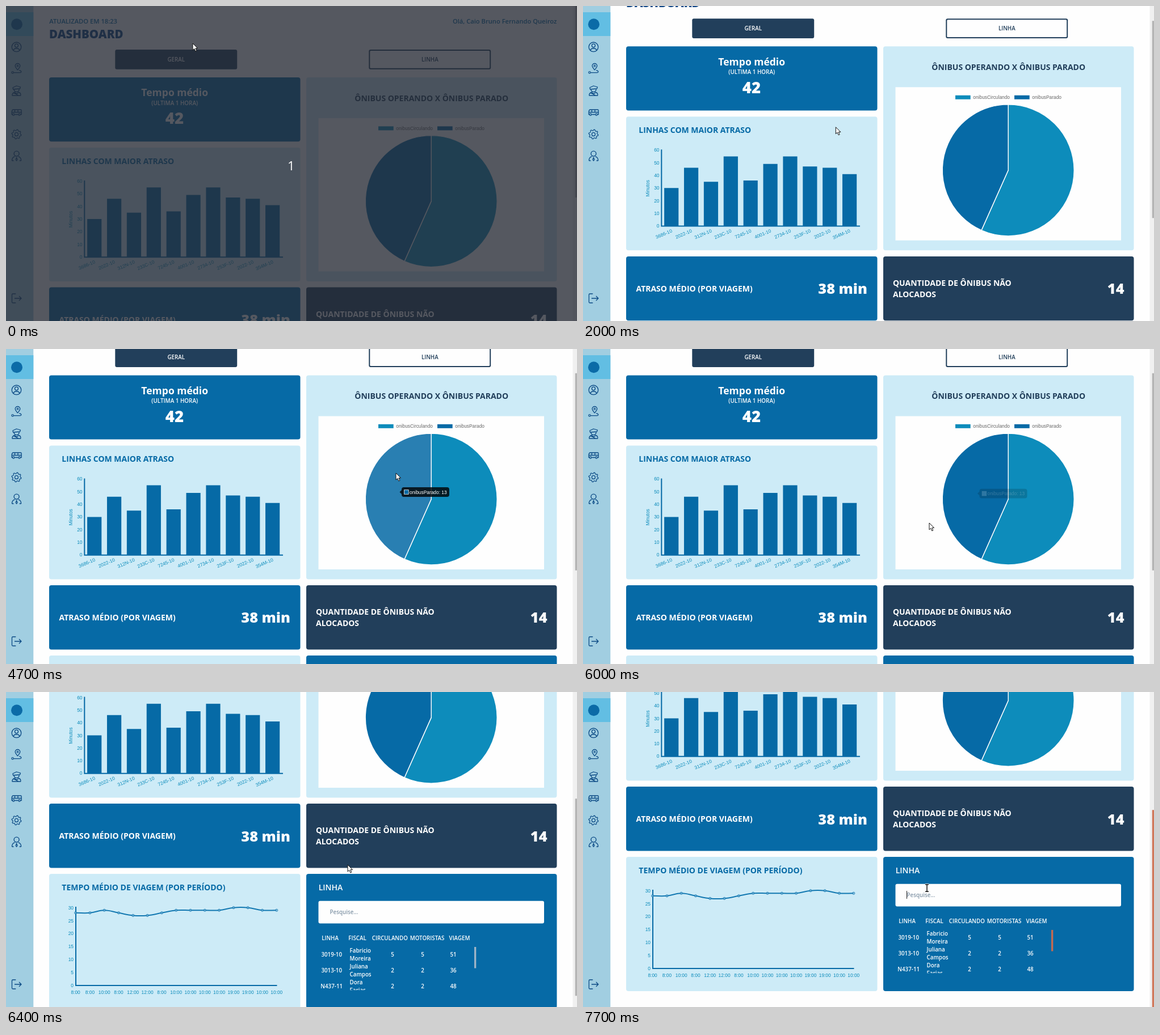
An HTML page with a canvas that plays this animation: 1006 px wide and 556 px high, repeating every 8 s.

```html
<!DOCTYPE html>
<html lang="pt-BR">
<head>
<meta charset="utf-8">
<title>Dashboard</title>
<style>
  html, body { margin: 0; width: 100%; height: 100%; overflow: hidden; background: #fefefe; }
  canvas { display: block; }
</style>
</head>
<body>
<canvas id="stage" width="1006" height="556"></canvas>
<script>
const ctx = document.getElementById('stage').getContext('2d');
const W = 1006, H = 556, LOOP = 8000, STEP = 100;
const SANS = '"Open Sans", sans-serif';
const CHART = '"Liberation Sans", Arial, sans-serif';
const BLUE = '#066aa6', LIGHT = '#cdebf7', TEAL = '#0d8cbb', NAVY = '#223f5b';
const ICON = '#0b4a85', WHITE = '#fefefe';

const BARS = [
  ['3686-10', 30], ['2022-10', 46], ['312N-10', 35], ['233C-10', 55], ['7245-10', 36],
  ['4001-10', 49], ['2734-10', 55], ['253F-10', 47], ['2022-10', 46], ['354M-10', 41]
];
const TRIPS = [28, 28, 29, 28, 27, 27, 28, 29, 29, 29, 29, 30, 30, 29, 29];
const HOURS = [8, 8, 10, 8, 12, 12, 8, 10, 10, 10, 10, 19, 19, 10, 10];
const ROWS = [
  ['3019-10', 'Fabricio', 'Moreira', 5, 5, 51],
  ['3013-10', 'Juliana', 'Campos', 2, 2, 36],
  ['N437-11', 'Dora', 'Farias', 2, 2, 48]
];

// Motion: each track is a list of [time, ...values]
const SCROLL = [[1600, 0], [1900, 46], [2200, 79.6], [6000, 79.6], [6400, 299.5], [6700, 299.5], [7100, 329.5]];
const POINTER = [
  [400, 329, 66], [1300, 449, 195], [1400, 460, 200], [1900, 460, 200], [2300, 366, 288],
  [2600, 366, 288], [3000, 331, 290], [3300, 331, 290], [3700, 263, 275], [4200, 427, 203],
  [4500, 655, 215], [4700, 687, 219], [4800, 687, 219], [5200, 785, 270], [5500, 785, 270],
  [5600, 785, 270], [5800, 655, 295], [6000, 610, 307], [6400, 602, 305], [6700, 602, 305],
  [7100, 588, 314], [7200, 588, 314], [7400, 606, 346]
];
const BAR_HOVERS = [[6, 2200, 2700], [5, 2700, 3500], [3, 3500, 4000]];
const BAR_TIP = [
  [2200, 345, 323], [2600, 345, 323], [2900, 287, 319.3], [3400, 287, 319.3], [3700, 240, 323]
];
const BAR_TIP_ALPHA = [[2100, 0], [2400, 1], [4000, 1], [4400, 0]];
const PIE_TIP = [[4800, 697, 323.7], [5200, 703, 347.5], [5600, 703, 347.5], [6000, 698.5, 326.3]];
const PIE_TIP_ALPHA = [[4300, 0], [4600, 1], [5700, 1], [6000, 0.2], [6100, 0]];

function track(t, keys) {
  let a = keys[0];
  if (t <= a[0]) return a.slice(1);
  for (const b of keys) {
    if (t < b[0]) {
      const p = (t - a[0]) / (b[0] - a[0]), e = p * p * (3 - 2 * p);
      return a.slice(1).map((v, i) => v + (b[i + 1] - v) * e);
    }
    a = b;
  }
  return a.slice(1);
}

function fade(t, on, off) {
  const up = Math.min(1, Math.max(0, (t - on) / 200));
  const down = Math.min(1, Math.max(0, (t - off) / 200));
  return up - down;
}

// y is the middle of the capital letters
function text(s, x, y, size, color, weight = 600, align = 'left', family = SANS) {
  ctx.font = `${weight} ${size}px ${family}`;
  ctx.textAlign = align;
  ctx.fillStyle = color;
  ctx.fillText(s, x, y + size * 0.357);
}

const label = (s, x, y, align, color = TEAL, weight = 400) =>
  text(s, x, y, 8.4, color, weight, align, CHART);

function turned(s, x, y, angle, align) {
  ctx.save();
  ctx.translate(x, y);
  ctx.rotate(angle);
  label(s, 0, 0, align);
  ctx.restore();
}

function box(x0, y0, x1, y1, color, r = 0) {
  ctx.beginPath();
  ctx.roundRect(x0, y0, x1 - x0, y1 - y0, r);
  ctx.fillStyle = color;
  ctx.fill();
}

function line(color, width, ...pts) {
  ctx.beginPath();
  for (let i = 0; i < pts.length; i += 2) ctx.lineTo(pts[i], pts[i + 1]);
  ctx.strokeStyle = color;
  ctx.lineWidth = width;
  ctx.stroke();
}

function disc(x, y, r, fill, stroke, width = 1.2) {
  ctx.beginPath();
  ctx.arc(x, y, r, 0, 7);
  if (fill) { ctx.fillStyle = fill; ctx.fill(); }
  if (stroke) { ctx.strokeStyle = stroke; ctx.lineWidth = width; ctx.stroke(); }
}

function drawHeader() {
  text('ATUALIZADO EM 18:23', 76.3, 27, 11.18, BLUE);
  text('DASHBOARD', 76, 49.7, 20.5, '#0a4384', 800);
  text('Olá, Caio Bruno Fernando Queiroz', 970.3, 27, 11.18, BLUE, 600, 'right');
  box(192.3, 77, 407.2, 111.7, NAVY, 3);
  text('GERAL', 299.7, 94.5, 9.78, WHITE, 600, 'center');
  box(639.3, 77, 854.2, 111.7, NAVY, 3);
  box(641.3, 79, 852.2, 109.7, WHITE, 1.5);
  text('LINHA', 746.8, 94.5, 9.78, NAVY, 600, 'center');
}

function drawAverages() {
  box(76, 126, 518.5, 239.2, BLUE, 4);
  text('Tempo médio', 297.2, 153, 17.5, WHITE, 700, 'center');
  text('(ULTIMA 1 HORA)', 297.2, 171.5, 9.9, WHITE, 600, 'center');
  text('42', 297, 198.6, 27.6, WHITE, 800, 'center');

  box(76, 496.6, 518.5, 610, BLUE, 4);
  text('ATRASO MÉDIO (POR VIAGEM)', 93.5, 554, 13.97, WHITE, 700);
  text('38 min', 501, 554, 25.3, WHITE, 800, 'right');
  box(529, 496.6, 970.5, 610, NAVY, 4);
  text('QUANTIDADE DE ÔNIBUS NÃO', 546, 544, 13.97, WHITE, 700);
  text('ALOCADOS', 546, 563.6, 13.97, WHITE, 700);
  text('14', 953.5, 554, 25.3, WHITE, 800, 'right');
}

const barX = i => 155.7 + i * 34.88;

function drawBars(t) {
  box(76, 250, 518.5, 486, LIGHT, 4);
  text('LINHAS COM MAIOR ATRASO', 98.3, 274, 13.97, BLUE, 700);
  turned('Minutos', 114, 376.5, -Math.PI / 2, 'center');
  for (let v = 0; v <= 60; v += 10) label(v, 134.5, 443 - v * 2.233, 'right');
  BARS.forEach(([name, v], i) => {
    const x = barX(i);
    const lit = BAR_HOVERS.reduce((m, h) => h[0] === i ? Math.max(m, fade(t, h[1], h[2])) : m, 0);
    box(x - 12.6, 443 - v * 2.233, x + 12.6, 443, `rgba(6,106,166,${1 - 0.17 * lit})`);
    turned(name, x + 0.8, 451, -0.4, 'right');
  });
  line(BLUE, 2, 138.3, 308, 138.3, 443.3, 488, 443.3);
}

function drawPie(t) {
  box(529, 126, 970.5, 486, LIGHT, 4);
  text('ÔNIBUS OPERANDO X ÔNIBUS PARADO', 749.7, 163, 13.97, NAVY, 700, 'center');
  box(550.5, 198, 948, 468.5, WHITE);
  box(656, 212.4, 682.7, 219.4, TEAL);
  label('onibusCirculando', 687.3, 215.8, 'left', '#666');
  box(760, 212.4, 786.7, 219.4, BLUE);
  label('onibusParado', 791.3, 215.8, 'left', '#666');

  const top = -Math.PI / 2, cut = top + Math.PI * 2 * 17 / 30;
  const parado = Math.max(fade(t, 4400, 4900), fade(t, 5700, 5750));
  const slices = [
    [top, cut, '13,140,187', fade(t, 4950, 5600)],
    [cut, top + Math.PI * 2, '6,106,166', parado]
  ];
  for (const [a, b, rgb, lit] of slices) {
    ctx.beginPath();
    ctx.moveTo(749.2, 344.6);
    ctx.arc(749.2, 344.6, 116, a, b);
    ctx.closePath();
    ctx.fillStyle = `rgba(${rgb},${1 - 0.14 * lit})`;
    ctx.fill();
    ctx.strokeStyle = WHITE;
    ctx.lineWidth = 1.4;
    ctx.stroke();
  }
}

function drawTrips() {
  box(76, 620.5, 518.5, 857.5, LIGHT, 4);
  text('TEMPO MÉDIO DE VIAGEM (POR PERÍODO)', 98.3, 645, 13.97, BLUE, 700);
  for (let v = 0; v <= 30; v += 5) label(v, 119, 817.2 - v * 4.567, 'right');
  line(BLUE, 2, 123, 678.5, 123, 817.4, 477.5, 817.4);
  const x = i => 122.6 + i * 25.3;
  const y = i => 817.2 - TRIPS[Math.min(14, Math.max(0, i))] * 4.567;
  const bend = i => (y(i + 1) - y(i - 1)) * 0.2;
  ctx.beginPath();
  ctx.moveTo(x(0), y(0));
  for (let i = 1; i < 15; i++) {
    ctx.bezierCurveTo(x(i - 1) + 10, y(i - 1) + bend(i - 1), x(i) - 10, y(i) - bend(i), x(i), y(i));
  }
  ctx.strokeStyle = '#1278b1';
  ctx.lineWidth = 2;
  ctx.stroke();
  HOURS.forEach((h, i) => {
    disc(x(i), y(i), 2.1, 'rgba(120,180,215,.55)', '#1278b1', 0.8);
    label(h + ':00', x(i), 829.2, 'center');
  });
}

function drawTable(t) {
  const late = t >= 7700;
  const cell = (s, x, y, align = 'center') => text(s, x, y, 9.78, WHITE, 600, align);
  box(529, 620.5, 970.5, 857.5, BLUE, 4);
  text('LINHA', 550.7, 645, 13.97, WHITE, 600);
  box(550.5, 668.3, 948, 708, WHITE, 3);
  text('Pesquise...', 570.6, 687.6, 9.78, '#8497a8', 600);
  if (late) line('#222', 1, 570.5, 680.5, 570.5, 694.5);
  cell('LINHA', 571, 733.8);
  cell('FISCAL', 619, 733.8);
  cell('CIRCULANDO', 676.3, 733.8);
  cell('MOTORISTAS', 742, 733.8);
  cell('VIAGEM', 799, 733.8);
  ctx.save();
  ctx.beginPath();
  ctx.rect(550, 745, 280, 80.7);
  ctx.clip();
  ROWS.forEach(([id, first, last, buses, drivers, trips], i) => {
    const y = 763.2 + i * 28;
    cell(id, 573.7, y);
    cell(first, 605.6, y - 6.8, 'left');
    cell(last, 605.6, y + 7.2, 'left');
    cell(buses, 681, y);
    cell(drivers, 734, y);
    cell(trips, 788, y);
  });
  ctx.restore();
  box(825, 749.5, 828.3, 787, late ? '#c56a50' : '#9fb4c6');
}

function caret(x, y, dx, dy) {
  ctx.beginPath();
  ctx.moveTo(x, y);
  ctx.lineTo(x + dx - (dx ? 0 : 3.5), y + dy - (dy ? 0 : 3.5));
  ctx.lineTo(x + dx + (dx ? 0 : 3.5), y + dy + (dy ? 0 : 3.5));
  ctx.fillStyle = 'rgba(0,0,0,.8)';
  ctx.fill();
}

function marker(x, y, color) {
  box(x, y, x + 8.4, y + 8.4, WHITE);
  box(x + 0.8, y + 0.8, x + 7.6, y + 7.6, color);
}

function drawTips(t) {
  const [barAlpha] = track(t, BAR_TIP_ALPHA), [pieAlpha] = track(t, PIE_TIP_ALPHA);
  if (barAlpha > 0) {
    const i = t < 2700 ? 6 : t < 3500 ? 5 : 3, [x, y] = track(t, BAR_TIP);
    ctx.globalAlpha = barAlpha;
    box(x, y, x + 39.5, y + 29.6, 'rgba(0,0,0,.8)', 4);
    if (i === 5) caret(x + 43, y + 14.8, -3.5, 0);
    else caret(x + 19.8, y - 3.5, 0, 3.5);
    label(BARS[i][0], x + 4.2, y + 8.4, 'left', '#fff', 700);
    marker(x + 4.2, y + 17, BLUE);
    label(BARS[i][1], x + 14, y + 21.3, 'left', '#fff');
  }
  if (pieAlpha > 0) {
    const moving = t >= 5000 && t < 5700, [x, y] = track(t, PIE_TIP);
    const w = moving ? 97 : 84;
    ctx.globalAlpha = pieAlpha;
    box(x, y, x + w, y + 16.8, 'rgba(0,0,0,.8)', 4);
    if (moving) caret(x + w + 3.5, y + 8.4, -3.5, 0);
    else caret(x - 3.5, y + 8.4, 3.5, 0);
    marker(x + 4.2, y + 4.2, moving ? TEAL : BLUE);
    label(moving ? 'onibusCirculando: 17' : 'onibusParado: 13', x + 14, y + 8.5, 'left', '#fff');
  }
  ctx.globalAlpha = 1;
}

const ICONS = new Path2D([
  'M13 78.3a5.7 4.8 0 0 1 11 0',
  'M20.5 113c-3-4-4.3-5-4.3-7.2a4.3 4.3 0 0 1 8.6 0c0 2.2-1.3 3.2-4.3 7.2M13.3 117.6H25q2.6-.5 1.6-2.4-1-1.4-3.4-1.6',
  'M12 144l6.5-3 7 2-1 3-12 1zM14.3 147v1.5a4.4 4 0 0 0 8.6 0V147M11 158v-2q1-3 4-3.5l3.7 2.6 3.8-2.6q3 .7 3.3 3.2v2.3zM13.5 153.5l9 4.5',
  'M11 191.5h-.8v-5q.3-3.3 2.6-3.5h13.4q1 .2 1 1.5v7h-1.5M15.3 191.5h6.4M10.5 187.5h16.5M15.5 183v4.5M21 183v4.5',
  'M10.5 273q0-6 5-7.4M26.7 273q0-6-5-7.4M10.5 273h3M23.7 273h3M18.6 267.2l-1.4 4 1.4 2 1.4-2z',
  'M17.3 508H12q-1.5 0-1.5 1.5v13q0 1.5 1.5 1.5h5.3M15 516h11.8M23 512l4 4-4 4'
].join(''));

function drawSidebar() {
  box(0, 0, 48.3, H, '#a1cee1');
  box(0, 11, 48.3, 53, '#62bee3');
  disc(19, 32.3, 10, '#0b6ba7');
  ctx.strokeStyle = ICON;
  ctx.lineWidth = 1.3;
  ctx.lineJoin = 'round';
  ctx.stroke(ICONS);
  disc(18.5, 72.3, 8.3, null, ICON, 1.3);
  disc(18.5, 69.8, 3, null, ICON, 1.3);
  disc(20.5, 105.8, 1.4, null, ICON, 1.1);
  disc(11.6, 117.2, 1.7, null, ICON, 1.2);
  disc(13.2, 191.6, 1.7, null, ICON, 1.2);
  disc(23.6, 191.6, 1.7, null, ICON, 1.2);
  disc(18.6, 260.6, 4.5, null, ICON, 1.4);
  disc(18.5, 226.4, 3, null, ICON, 1.2);
  ctx.beginPath();
  for (let i = 0; i < 32; i++) {
    const a = (i + 0.5) * Math.PI / 16, r = i % 4 < 2 ? 8.4 : 6.6;
    ctx.lineTo(18.5 + r * Math.cos(a), 226.4 + r * Math.sin(a));
  }
  ctx.closePath();
  ctx.stroke();
  ctx.lineJoin = 'miter';
}

const ARROW = new Path2D('M0 0V12L2.8 9.4 4.8 14 6.8 13.1 4.9 8.7H8.6Z');
const BEAM = new Path2D('M-3-6.3h2q1 0 1 1V5.3q0 1-1 1h-2M3-6.3H1q-1 0-1 1V5.3q0 1 1 1h2');

function drawPointer(t) {
  const [x, y] = track(t, POINTER);
  ctx.save();
  ctx.translate(x, y);
  if (t >= 7400) {
    ctx.strokeStyle = WHITE;
    ctx.lineWidth = 3;
    ctx.stroke(BEAM);
    ctx.strokeStyle = '#111';
    ctx.lineWidth = 1.5;
    ctx.stroke(BEAM);
  } else {
    ctx.fillStyle = '#fff';
    ctx.fill(ARROW);
    ctx.strokeStyle = '#111';
    ctx.lineWidth = 1;
    ctx.stroke(ARROW);
  }
  ctx.restore();
}

function draw(t) {
  const [scroll] = track(t, SCROLL);
  box(0, 0, W, H, WHITE);
  ctx.save();
  ctx.translate(0, -scroll);
  drawHeader();
  drawAverages();
  drawBars(t);
  drawPie(t);
  drawTrips();
  drawTable(t);
  drawTips(t);
  ctx.restore();
  drawSidebar();

  const thumb = -10 + scroll * 0.662;
  box(998.5, 0, W, H, '#f0f0f0');
  box(1002.7, thumb, W, thumb + 348, t >= 7700 ? '#d0785a' : '#b4b4b4');

  if (t < 500) {
    box(0, 0, W, H, 'rgba(38,42,52,.78)');
    text('1', 502.3, 282, 22, '#fff', 400, 'center');
  }
  drawPointer(t);
}

function tick(now) {
  draw(Math.floor(now % LOOP / STEP) * STEP);
  requestAnimationFrame(tick);
}
requestAnimationFrame(tick);
</script>
</body>
</html>
```
